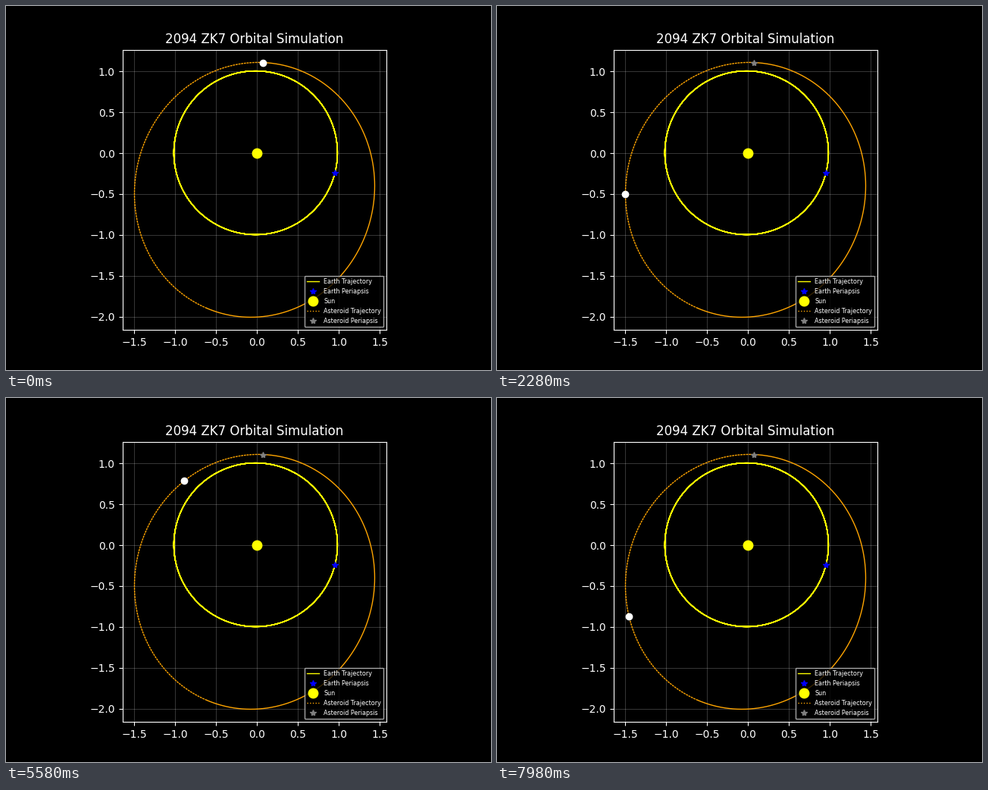
A matplotlib script that plays this animation: 640 px wide and 480 px high, repeating every 8 s.

```python
import numpy as np
import matplotlib.pyplot as plt
from matplotlib.animation import FuncAnimation

FRAMES = 267
STEP_MS = 30
PERIOD = 96.93            # frames per asteroid revolution

# Projected ellipse: MAJOR * (cos E - ECC) + MINOR * sin E, Sun at the focus
ECC = 0.2883
MAJOR = np.array([0.102, 1.5548])
MINOR = np.array([1.4645, -0.060])

EARTH_ECC = 0.0167
EARTH_PERI = np.radians(-14.1)
EARTH_TURNS = 5

plt.rcParams.update({
    "font.family": "DejaVu Sans",
    "figure.facecolor": "black",
    "axes.facecolor": "black",
    "axes.edgecolor": "white",
    "axes.labelcolor": "white",
    "text.color": "white",
    "xtick.color": "white",
    "ytick.color": "white",
})


def asteroid(anomaly):
    """Position on the asteroid orbit for an eccentric anomaly."""
    along, across = np.cos(anomaly) - ECC, np.sin(anomaly)
    return (MAJOR[0] * along + MINOR[0] * across,
            MAJOR[1] * along + MINOR[1] * across)


def earth(anomaly):
    """Position on the Earth orbit for an eccentric anomaly."""
    x = np.cos(anomaly) - EARTH_ECC
    y = np.sqrt(1 - EARTH_ECC ** 2) * np.sin(anomaly)
    c, s = np.cos(EARTH_PERI), np.sin(EARTH_PERI)
    return c * x - s * y, s * x + c * y


def solve_kepler(mean):
    """Eccentric anomaly from mean anomaly, by Newton's method."""
    e = mean + ECC * np.sin(mean)
    for _ in range(6):
        e -= (e - ECC * np.sin(e) - mean) / (1 - ECC * np.cos(e))
    return e


def point(ax, pos, marker, color, size=6, **kw):
    return ax.plot([pos[0]], [pos[1]], marker, color=color,
                   markersize=size, **kw)[0]


fig, ax = plt.subplots(figsize=(6.4, 4.8), dpi=100)
ax.set_aspect("equal")
ax.set_title("2094 ZK7 Orbital Simulation")
ax.grid(color="white", alpha=0.3, linewidth=0.5)

# Repeated turns in one path build up the crisp, heavy edge
turns = np.linspace(0, 2 * np.pi * EARTH_TURNS, 365 * EARTH_TURNS)
ax.plot(*earth(turns), color="yellow", linewidth=1, label="Earth Trajectory")
point(ax, earth(0), "*", "blue", label="Earth Periapsis")
point(ax, (0, 0), "o", "yellow", 9, label="Sun")

# Overlapping dotted turns: two on the left, closed by a third on the right
closed = 3.48
ax.plot(*asteroid(np.linspace(0, closed, 400)), color="orange", linewidth=1)
ax.plot(*asteroid(np.linspace(closed, 2 * np.pi, 400)), color="orange",
        linewidth=1, linestyle=(0, (2, 0.65)), label="Asteroid Trajectory")
point(ax, asteroid(0), "*", "gray", label="Asteroid Periapsis")

body = point(ax, asteroid(0), "o", "white", zorder=4)

legend = ax.legend(loc="lower right", fontsize="xx-small")
legend.get_lines()[3].set_linestyle(":")


def update(frame):
    x, y = asteroid(solve_kepler(2 * np.pi * frame / PERIOD))
    body.set_data([x], [y])
    return (body,)


anim = FuncAnimation(fig, update, frames=FRAMES, interval=STEP_MS,
                     repeat=True, repeat_delay=0)
plt.show()
```
